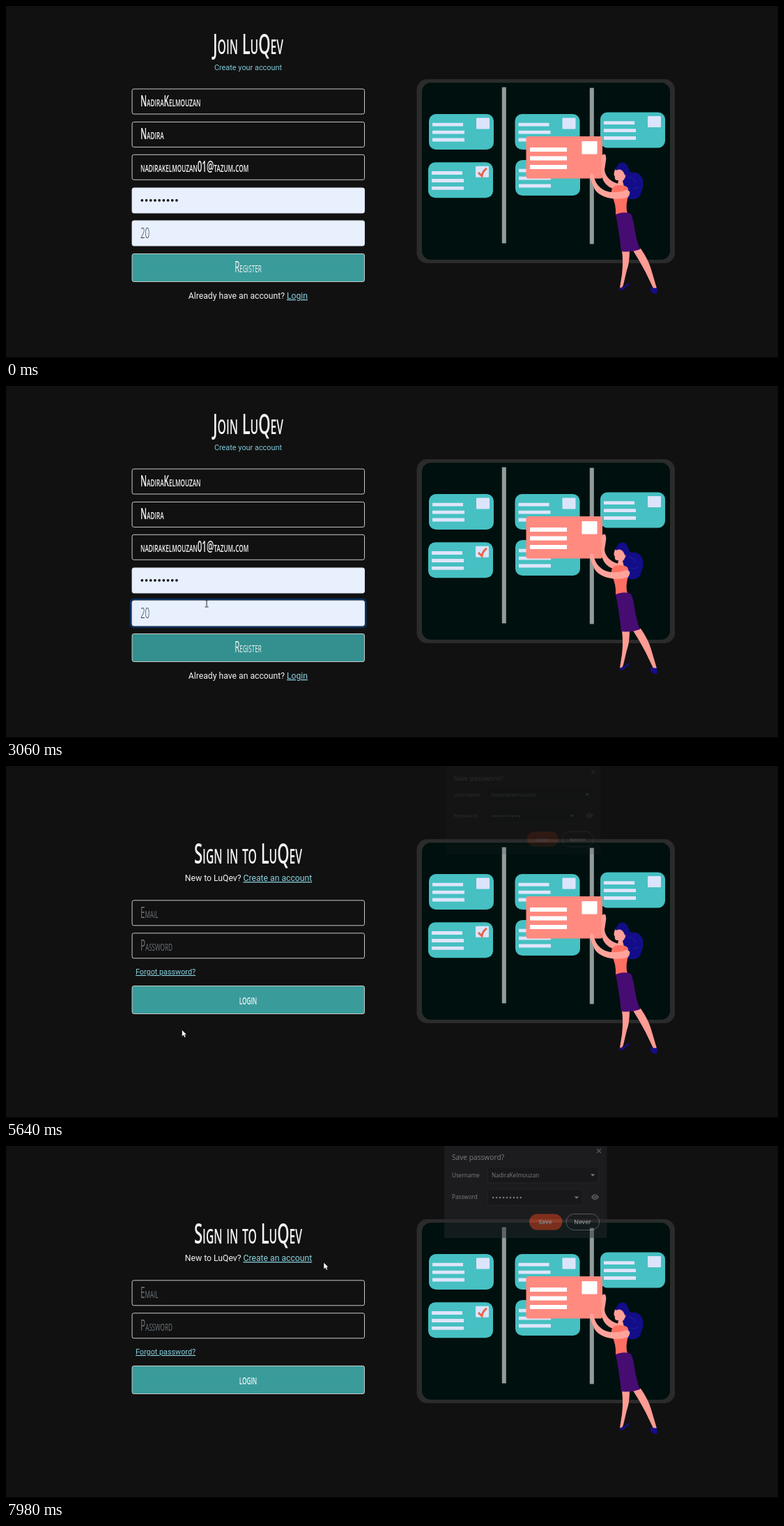
An HTML page that plays this animation: 1108x505 px, repeating every 8 s.

```html
<!DOCTYPE html>
<html lang="en">
<head>
<meta charset="utf-8">
<title>Sign-up flow</title>
<style>
  html, body { margin: 0; width: 100%; height: 100%; overflow: hidden; background: #111; }
  svg { display: block; width: 1108px; height: 505px; }
  .hand { font-family: "Open Sans", "Noto Sans", sans-serif; font-variant: small-caps; }
  .body { font-family: Roboto, sans-serif; font-weight: 400; }
  .ui { font-family: "Open Sans", "Noto Sans", sans-serif; font-size: 8.2px; fill: #f1f1f1; }
  .link { text-decoration: underline; }
</style>
</head>
<body>
<svg id="stage" viewBox="0 0 1108 505"></svg>
<script>
const LOOP = 8000;
const CONDENSE = 0.55; // one narrow look for all hand lettering
const WHITE = '#f4f4f4', CYAN = '#8bd5e4', TEAL = [58, 155, 155];
const USER = 'NadiraKelmouzan', APP = 'LuQev';

const hand = (x, y, text, { size = 21, fill = WHITE, weight = 600, anchor = 'start' } = {}) =>
  `<text class="hand" transform="translate(${x} ${y}) scale(${CONDENSE} 1)" font-size="${size}"
    font-weight="${weight}" fill="${fill}" text-anchor="${anchor}">${text}</text>`;

const body = (x, y, text, size, fill = WHITE, anchor = 'start', extra = '') =>
  `<text class="body ${extra}" x="${x}" y="${y}" font-size="${size}" fill="${fill}" text-anchor="${anchor}">${text}</text>`;

const box = (x, y, w, h, rx, fill, more = '') =>
  `<rect x="${x}" y="${y}" width="${w}" height="${h}" rx="${rx}" fill="${fill}" ${more}/>`;

const field = (y, { fill = 'none', stroke = '#c9c9c9', h = 36, id = '' } = {}) =>
  box(181, y, 333.5, h, 2.5, fill, `stroke="${stroke}" id="${id}"`);

const ring = (id, y, h) =>
  box(179.2, y - 1.8, 337.1, h + 3.6, 4, 'none', `id="${id}" stroke="#0c305b" stroke-width="2.8" opacity="0"`);

const dots = (x, y, gap, width, color) =>
  `<path d="M${x} ${y}h${gap * 8 + 0.1}" stroke="${color}" stroke-width="${width}"
    stroke-linecap="round" stroke-dasharray="0 ${gap}"/>`;

const title = { size: 40, anchor: 'middle' };
const filled = { fill: '#e8f0fe', stroke: '#dfe6f3' };
const hint = { fill: '#6c757d', weight: 400 };

const registerPage = `<g id="registerPage">
  ${hand(347.5, 69, `Join ${APP}`, title)}
  ${body(347.5, 92, 'Create your account', 10.9, '#80cad8', 'middle')}
  ${field(119)}${hand(193, 144, USER)}
  ${field(166.4)}${hand(193, 191, 'Nadira')}
  ${field(213.3)}${hand(193, 238, 'nadirakelmouzan01@tazum.com')}
  ${field(261, filled)}${dots(195.3, 278.8, 6.2, 3.8, '#111')}
  ${ring('ageRing', 308, 36)}${field(308, filled)}${hand(193, 333, '20', { fill: '#263238', weight: 300 })}
  ${ring('buttonRing', 355.5, 40)}${field(355.5, { h: 40, id: 'register' })}
  ${hand(347.5, 382, 'Register', { anchor: 'middle', weight: 500 })}
  ${body(400, 420, 'Already have an account?', 12.2, WHITE, 'end')}
  ${body(403, 420, 'Login', 12.2, CYAN, 'start', 'link')}
</g>`;

const loginPage = `<g id="loginPage">
  ${hand(347.5, 140, `Sign in to ${APP}`, title)}
  ${body(337.5, 165, `New to ${APP}?`, 12.2, WHITE, 'end')}
  ${body(340.5, 165, 'Create an account', 12.2, CYAN, 'start', 'link')}
  ${field(192.8)}${hand(193, 218, 'Email', hint)}
  ${field(239.8)}${hand(193, 265, 'Password', hint)}
  ${body(186, 299, 'Forgot password?', 10.8, CYAN, 'start', 'link')}
  ${field(315.5, { h: 40, fill: `rgb(${TEAL})` })}
  ${hand(347.5, 341.5, 'login', { anchor: 'middle' })}
</g>`;

const card = (x, y) => `<g transform="translate(${x} ${y})">
  ${box(0, 0, 93, 51, 10, '#46c0c2')}
  <path d="M5 15.2h44M5 26.2h46M5 37h46" stroke="#dfe5fb" stroke-width="4.8"/>
  ${box(68, 5.5, 19, 16, 1, '#dbe4fb')}</g>`;

const woman = `<g>
  <path d="M876 263C859 261 852 245 855 229L854 219Q856 211 860 213Q862 216 861 222L859 235Q861 251 882 256Z" fill="#ff9c94"/>
  <path d="M877 234C876 224 887 221 892 229C895 236 893 238 899 239C906 237 915 244 914 253C916 261 912 263 911 270C908 278 898 279 891 275C885 268 889 259 884 249Z" fill="#130d89"/>
  <path d="M893 246q9-1 11 8M897 261q7 2 11-2" fill="none" stroke="#211a9c" stroke-width="1.2"/>
  <path d="M874 235Q880 230 887 235L890 242Q888 249 885 251L887 259L877 260L879 250Q873 251 874 245Q871 242 874 235Z" fill="#ffa199"/>
  <path d="M875 236Q877 223 888 227Q893 232 891 239L889 244L886 238Q882 232 875 236Z" fill="#130d89"/>
  <path d="M874 258Q885 255 892 260Q895 266 892 277Q889 289 892 298L875 299Q876 285 869 270Q868 261 874 258Z" fill="#ff7062"/>
  <path d="M890 264Q899 265 893 274C877 280 853 276 845 263L839 249Q836 241 840 240Q844 241 845 249Q849 260 860 265Q873 270 890 264Z" fill="#ffa39b"/>
  <path d="M884 351L895 350Q895 369 891 379L886 400Q884 406 881 404L884 385Q886 368 884 351ZM900 351L911 348Q922 364 926 378L934 405L929 405L918 382Q909 365 900 351Z" fill="#ff9c94"/>
  <path d="M875 299Q886 294 897 298C903 312 902 331 910 349Q897 354 883 352Q880 323 875 299Z" fill="#460c72"/>
  <path d="M894 397L893 404L891 401Q888 408 880 408Q880 405 887 402ZM925 403Q931 406 935 404L934 413Q928 413 925 409Z" fill="#150e8b"/>
</g>`;

const illustration = `
  ${box(589.5, 105, 370.5, 264, 15, '#2b2b2b')}
  ${box(597, 110, 356, 254, 13, '#00100f')}
  ${box(711.8, 116.5, 6, 224, 0, '#929c9a')}
  ${box(837.8, 117.5, 6, 224, 0, '#929c9a')}
  ${card(607, 155)}${card(606, 224.3)}${card(730.5, 155)}${card(731, 221)}${card(853, 152.5)}
  <path d="M678 239L683 244Q684 237 690 233" fill="none" stroke="#e46445" stroke-width="2.8"/>
  ${box(746.5, 187, 109.5, 60.5, 3, '#ff8a80')}
  <path d="M752 206h53M752 218.5h53M752 231h53" stroke="#fff" stroke-width="6"/>
  ${box(826.5, 194, 22, 18.5, 1, '#fff')}
  ${woman}`;

const popup = `<g id="popup">
  ${box(626, -4, 233.5, 134, 2, '#292a2e')}
  <path d="M845 2l6 6m0-6l-6 6" stroke="#a5a6aa" stroke-width="1.2"/>
  <text class="ui" x="637" y="18.4" style="font-size:10.2px">Save password?</text>
  <text class="ui" x="637" y="42.5">Username</text>
  <text class="ui" x="637" y="74.3">Password</text>
  ${box(688.5, 28, 159, 23, 1.5, '#202125', 'stroke="#38393d"')}
  ${box(688.5, 60, 136, 23, 1.5, '#202125', 'stroke="#38393d"')}
  <text class="ui" x="694" y="42.5">${USER}</text>
  ${dots(696.2, 72, 4.95, 2.6, '#eee')}
  <path d="M836 38.3h6.4l-3.2 3.3zM812.7 70.5h6.4l-3.2 3.3z" fill="#e8e8e8"/>
  <path d="M836.8 71.3q5.6-8 11.2 0q-5.600 8-11.200 0z" fill="#a5a6aa"/>
  <circle cx="842.4" cy="71.300" r="2" fill="#a5a6aa" stroke="#292a2e"/>
  ${box(748, 95.5, 47.5, 23, 11.5, '#fb542b', 'id="save"')}
  ${box(801, 95.5, 47.5, 23, 11.5, 'none', 'stroke="#a6a6aa"')}
  <text class="ui" x="771" y="110" text-anchor="middle" font-weight="700">Save</text>
  <text class="ui" x="824.5" y="110" text-anchor="middle" font-weight="700">Never</text>
</g>`;

const cursors = `<g id="cursor">
  <path id="arrow" d="M0 0V9.7L2.300 7.700L3.800 11L5.600 10.200L4.200 7H7Z" fill="#fff" stroke="#111" stroke-width=".6"/>
  <path id="pointer" d="M-1 1Q0-.6 1 1V5L4.600 6Q5.600 6.500 5.300 8L4.500 12H-.5L-3.500 8Q-4 6.200-2.600 6.500L-1 7.700Z" fill="#fff" stroke="#111" stroke-width=".6"/>
  <path id="beam" d="M-2.500-5H-.6L0-4.500L.6-5H2.500M0-4.500V4.500M-2.500 5H-.6L0 4.500L.6 5H2.500" fill="none" stroke-width="1"/>
</g>`;

const stage = document.getElementById('stage');
stage.innerHTML = box(0, 0, 1108, 505, 0, '#111') + box(0, 504, 1108, 1, 0, '#000') +
  registerPage + loginPage + illustration + popup + cursors;

const el = id => document.getElementById(id);
const set = (id, name, value) => el(id).setAttribute(name, value);
const show = (id, visible) => set(id, 'visibility', visible ? 'visible' : 'hidden');
const ramp = (t, start, end) => Math.max(0, Math.min(1, (t - start) / (end - start)));
const mix = (a, b, k) => a + (b - a) * k;
const mixColor = (a, b, k) => a.map((v, i) => Math.round(mix(v, b[i], k)));

// time, x, y of the pointer's hot spot
const path = [
  [70, 914, 449], [520, 480, 104], [820, 338, 182], [1030, 329, 201], [1240, 292, 333],
  [1850, 292, 333], [2060, 312, 364], [2200, 312, 364], [2600, 300, 228], [2660, 300, 228],
  [2800, 294, 360], [2970, 291, 360], [3060, 288, 312], [3450, 217, 151], [3660, 207, 331],
  [3860, 207, 331], [4200, 252.5, 378.5], [6290, 252.5, 378.5], [7030, 768, 114],
  [7230, 762.5, 117.5], [7570, 765, 114], [7770, 765, 114], [7980, 456, 167],
];

function pointerAt(t) {
  const i = path.findIndex(p => p[0] > t);
  if (i === 0) return path[0].slice(1);
  if (i < 0) return path[path.length - 1].slice(1);
  const [t0, x0, y0] = path[i - 1], [t1, x1, y1] = path[i];
  const k = ramp(t, t0, t1), eased = k * k * (3 - 2 * k);
  return [mix(x0, x1, eased), mix(y0, y1, eased)];
}

function drawCursor(t, onLogin) {
  const [x, y] = pointerAt(t);
  const inForm = x > 181 && x < 514;
  const over = (tops, h) => inForm && tops.some(top => y >= top && y <= top + h);
  const typing = over(onLogin ? [193, 240] : [119, 166, 213, 261, 308], 36);
  const pressing = over([onLogin ? 315 : 355], 40);
  set('cursor', 'transform', `translate(${x} ${y})`);
  set('beam', 'stroke', !onLogin && y > 260 ? '#222' : '#ddd');
  show('beam', t >= 70 && typing);
  show('pointer', t >= 70 && pressing);
  show('arrow', t >= 70 && !typing && !pressing);
}

function draw(t) {
  const onLogin = t >= 5640;
  show('registerPage', !onLogin);
  show('loginPage', onLogin);

  const hover = ramp(t, 2030, 2180) - ramp(t, 2280, 2430) +
    ramp(t, 2780, 2930) - ramp(t, 2990, 3130) + ramp(t, 4100, 4250);
  const pressed = ramp(t, 4400, 4550);
  const color = mixColor(mixColor(TEAL, [44, 133, 131], hover), [6, 68, 67], pressed);
  set('register', 'fill', `rgb(${color})`);
  set('register', 'stroke', `rgb(${mixColor([201, 201, 201], [92, 150, 222], pressed)})`);
  set('ageRing', 'opacity', ramp(t, 1390, 1590) - pressed);
  set('buttonRing', 'opacity', pressed);

  const entering = ramp(t, 5640, 5830), leaving = ramp(t, 7840, 7980);
  const scale = mix(0.95, 1, entering);
  show('popup', onLogin);
  set('popup', 'opacity', mix(0.12, 1, entering) * mix(1, 0.47, leaving));
  set('popup', 'transform', `translate(${742.7 + 3 * leaving} ${65 + 2 * leaving}) scale(${scale}) translate(-742.7 -65)`);
  set('save', 'fill', t > 7400 && t < 7800 ? '#fc6742' : '#fe522a');

  drawCursor(t, onLogin);
}

const start = performance.now();
function tick() {
  draw((performance.now() - start) % LOOP);
  requestAnimationFrame(tick);
}
tick();
</script>
</body>
</html>
```
